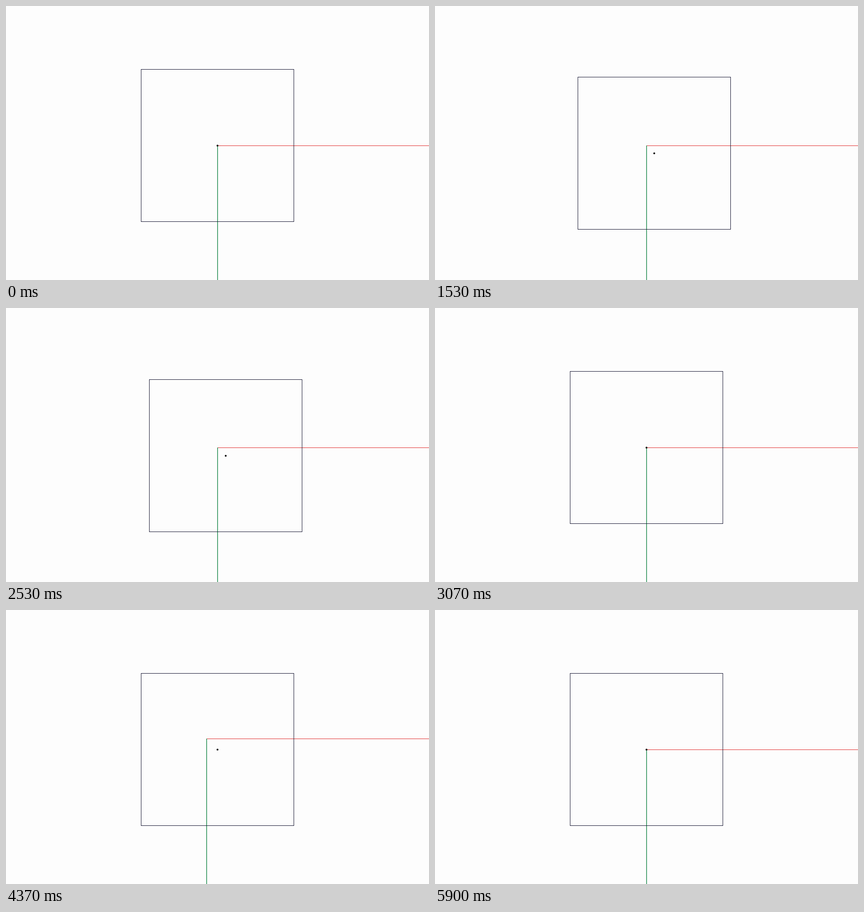
Animation, 928 px wide and 603 px high, one loop 6260 ms. Source, as an HTML page with a canvas:

```html
<!DOCTYPE html>
<html>
<head>
<meta charset="utf-8">
<style>
  html, body { margin: 0; overflow: hidden; background: #fdfdfd; }
  canvas { display: block; }
</style>
</head>
<body>
<canvas id="stage" width="928" height="603"></canvas>
<script>
const ctx = document.getElementById('stage').getContext('2d');
const LOOP = 6260, HALF_TRIP = 937, REACH = 37;
const CENTER = { x: 464, y: 307 }, SIDE = 335;

// Steady move out along the diagonal and back again.
function shift(time, start) {
  const distance = Math.abs(time - start - HALF_TRIP) / HALF_TRIP;
  return Math.round(REACH * Math.max(0, 1 - distance));
}

function line(x1, y1, x2, y2, color, width) {
  ctx.strokeStyle = color;
  ctx.lineWidth = width;
  ctx.beginPath();
  ctx.moveTo(x1, y1);
  ctx.lineTo(x2, y2);
  ctx.stroke();
}

function drawAxes(x, y) {
  line(x, y + 0.5, 928, y + 0.5, '#e02828', 1);
  line(x + 0.25, y, x + 0.25, 603, '#1c8a4c', 1.5);
}

function drawSquare(x, y) {
  ctx.strokeStyle = '#12122e';
  ctx.lineWidth = 1;
  ctx.strokeRect(x - SIDE / 2, y - SIDE / 2, SIDE, SIDE);
  ctx.fillStyle = '#000';
  ctx.beginPath();
  ctx.arc(x, y + 0.3, 2, 0, Math.PI * 2);
  ctx.fill();
}

function draw(now) {
  const time = now % LOOP;
  const squareShift = shift(time, 1110);
  const axesShift = shift(time, 3100);
  ctx.fillStyle = '#fdfdfd';
  ctx.fillRect(0, 0, 928, 603);
  drawAxes(CENTER.x - axesShift, CENTER.y - axesShift);
  drawSquare(CENTER.x + squareShift, CENTER.y + squareShift);
  requestAnimationFrame(draw);
}
requestAnimationFrame(draw);
</script>
</body>
</html>
```
